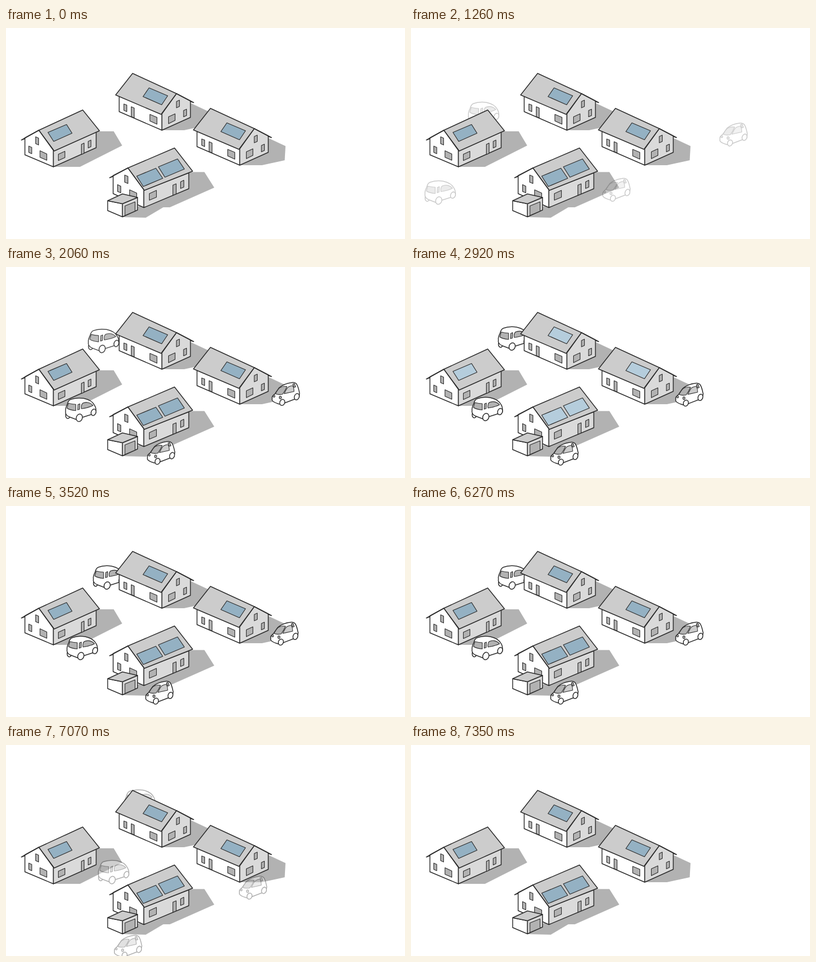
An HTML page that plays this animation: 728x386 px, repeating every 9350 ms.

```html
<!DOCTYPE html>
<html lang="en">
<head>
<meta charset="utf-8">
<title>Houses and cars</title>
<style>
html, body { margin: 0; width: 100%; height: 100%; overflow: hidden; background: #fff; }
svg { display: block; }
path, ellipse { stroke: #2b2b2b; stroke-width: 1.5; stroke-linejoin: round; stroke-linecap: round; fill: #fff; }
.shadow { fill: #b2b2b2; stroke: none; }
.side { fill: #dadada; }
.roof { fill: #ccc; }
.line { fill: none; }
.win { fill: #b2b2b2; stroke-width: 1.1; }
.panel { fill: #94b1c3; stroke-width: 1.2; }
.car path, .car ellipse { stroke-width: 1.4; }
.car .win { stroke-width: 1; }
</style>
</head>
<body>
<svg width="728" height="386" viewBox="0 0 728 386">
<defs>
  <g id="houseRight">
    <path class="shadow" d="M284 187L325 187 366.500 178 368 152 336 137Z"/>
    <path d="M206.500 125V153L284.500 187V157Z"/>
    <path class="side" d="M284.500 157V187L336.500 163.500V133.500L311 120Z"/>
    <path class="line" d="M311 120L342.500 136.500 336.500 134.500"/>
    <path class="roof" d="M231 83L311 120 283 158 200 122.500Z"/>
    <path class="win" d="M215 139l5.500 2v12l-5.500-2.500ZM228.500 144l5.500 2.500v18l-5.500-2.500ZM262.500 158l13 5.500v12.500l-13-6Z
      M311 134.500l5.500-2.500v11.500l-5.500 2.500ZM324 151l5.500-2.500v11.500l-5.500 2.500ZM296.500 162.500l12-5.500v12l-12 6Z"/>
    <path class="panel" d="M261 109.500L295 124 284 140.500 250 125.500Z"/>
  </g>
  <g id="carFront">
    <path d="M1 27C2 24 6 22 7 20L14 10C20 5 28 2 35 1C40 0 44 1 46 4C49 9 50 15 51 20L50 28 24 38 14 40C8 38 3 37 1 33Z"/>
    <path class="win" d="M7 21C10 16 12 12 15 10C19 8 24 7 28 8C26 13 23 18 20 22C15 23 11 23 7 21Z"/>
    <path class="win" style="fill:#ccc" d="M23 21C26 15 28 10 31 8.500C34 7 38 6 39 7C41 11 41 14 41 17Z"/>
    <path class="win" d="M38.500 3.500L41.500 2.500 44 8.500 41 9.500Z"/>
    <ellipse cx="19.500" cy="37" rx="4.500" ry="5.700" transform="rotate(20 19.500 37)"/>
    <ellipse cx="46" cy="26.500" rx="4.300" ry="6" transform="rotate(20 46 26.500)"/>
    <ellipse class="win" cx="16" cy="28" rx="2" ry="2.500"/>
    <ellipse class="win" cx="4.500" cy="25.500" rx="1.700" ry="2"/>
  </g>
  <g id="carBack">
    <ellipse cx="5" cy="32" rx="4" ry="6"/>
    <path d="M1 24C0 20 2 16 4 12C5 8 7 4 10 3C18 0 27 0 34 1C44 3 51 8 54 14C57 19 57 23 56 28L31 36 21 40 8 35C3 33 0 29 1 24Z"/>
    <path class="win" d="M3.500 19L6 10C10 11 15 12 19.500 12V23.500C14 23 8 22 3.500 19Z"/>
    <path class="win" d="M23.500 12.500L27 11 26.500 21 23 22Z"/>
    <path class="win" d="M30 20C29 15 30 12 32 10C38 7 46 8 51 14C45 17 38 19 30 20Z"/>
    <ellipse cx="26" cy="36.500" rx="5.500" ry="7" transform="rotate(20 26 36.500)"/>
    <ellipse cx="52" cy="26.500" rx="4.300" ry="6" transform="rotate(20 52 26.500)"/>
  </g>
</defs>

<use class="car" href="#carBack"/>
<use href="#houseRight"/>
<use href="#houseRight" x="142" y="64"/>
<use class="car" href="#carFront"/>

<g>
  <path class="shadow" d="M87 254H135L212 215 196.500 189H164Z"/>
  <path d="M34.500 201V232L86.500 254V224L60 187Z"/>
  <path class="side" d="M86.500 225V254L164.500 219V190Z"/>
  <path class="line" d="M60 187L28 205 34.500 202.500"/>
  <path class="roof" d="M60 187L140 150 170.500 188 88 225Z"/>
  <path class="win" d="M54 199l5.500 2.500v12.500l-5.500-2.500ZM41.500 216l5.500 2.500v11.500l-5.500-2.500ZM62 224.500l12.500 6v11.500l-12.500-5.500Z
    M95.500 231l12-5.500v11.500l-12 5.500ZM137.500 213l5-2.500v18.500l-5 2.500ZM150 207.500l5-2.500v12l-5 2.500Z"/>
  <path class="panel" d="M76.500 191L110.500 176.500 120.500 192.500 87 207.500Z"/>
</g>
<use class="car" href="#carBack"/>

<g>
  <path class="shadow" d="M213 346L255 347 287 328H299L380 292 362 263.500H333Z"/>
  <path d="M195.500 270V303L251.500 328.500V296L222.500 256Z"/>
  <path class="side" d="M251.500 297V328.500L333.500 294V265Z"/>
  <path class="line" d="M222.500 256L189 274 195.500 271.500"/>
  <path class="roof" d="M222.500 256L307.500 219.500 340.500 262 252.500 297Z"/>
  <path class="win" d="M216.500 269l6 2.500v13l-6-2.500ZM203.500 286.500l6 3v12l-6-2.500ZM225.500 296l13 6v12l-13-5Z
    M261.500 303l13-6v12.500l-13 5.500ZM304.500 287.500l6-2.500v18.500l-6 2.500ZM318.500 281.500l6-3v12.500l-6 2.500Z"/>
  <path class="panel" d="M238.500 271L273.500 256.500 286 275 250.500 290ZM278 254L313 239.500 325.500 258 290 273Z"/>
  <path d="M185.500 316V334L212.500 345.500V321.500Z"/>
  <path class="side" d="M212.500 321.500V345.500L240 333V310Z"/>
  <path class="roof" d="M185.500 316L212.500 303.500 240 310 212.500 321.500Z"/>
  <path class="win" d="M217 325.500L235.500 318V335L217 343Z"/>
</g>
<use class="car" href="#carFront"/>
</svg>
<script>
const LOOP = 9350, LEAVE = 92, SLOPE = -0.48;
// parking place, driving direction, arrival distance, steady arrival speed
const cars = [
  { x: 158.500, y: 109, dir: 1, come: 65, steady: true },
  { x: 482, y: 212, dir: -1, come: 107 },
  { x: 110.500, y: 238, dir: 1, come: 114 },
  { x: 254, y: 320, dir: -1, come: 126 }
];
const carNodes = document.querySelectorAll('.car');
const panels = document.querySelectorAll('.panel');

const part = (t, from, to) => Math.min(1, Math.max(0, (t - from) / (to - from)));
const easeOut = u => Math.sin(u * Math.PI / 2);
const easeIn = u => 1 - Math.cos(u * Math.PI / 2);
const mix = (a, b, k) => a + (b - a) * k;

function draw(now) {
  const t = now % LOOP;
  const arrive = part(t, 1080, 2220);
  const leave = easeIn(part(t, 6250, 7340));
  cars.forEach((car, i) => {
    const near = car.steady ? arrive : easeOut(arrive);
    const shown = car.steady ? arrive ** 0.75 : near;
    const move = car.dir * (LEAVE * leave - car.come * (1 - near));
    carNodes[i].setAttribute('transform', `translate(${car.x + move} ${car.y + move * SLOPE})`);
    carNodes[i].style.opacity = t < 1100 ? 0 : shown * (1 - leave);
  });

  const glow = Math.sin(Math.PI * part(t, 2700, 3520));
  const fill = `rgb(${mix(148, 192, glow)},${mix(177, 214, glow)},${mix(195, 228, glow)})`;
  panels.forEach(p => p.style.fill = fill);
  // cloned houses inherit the fill from their definition
  requestAnimationFrame(next);
}
const start = performance.now();
function next() { draw(performance.now() - start); }
next();
</script>
</body>
</html>
```
